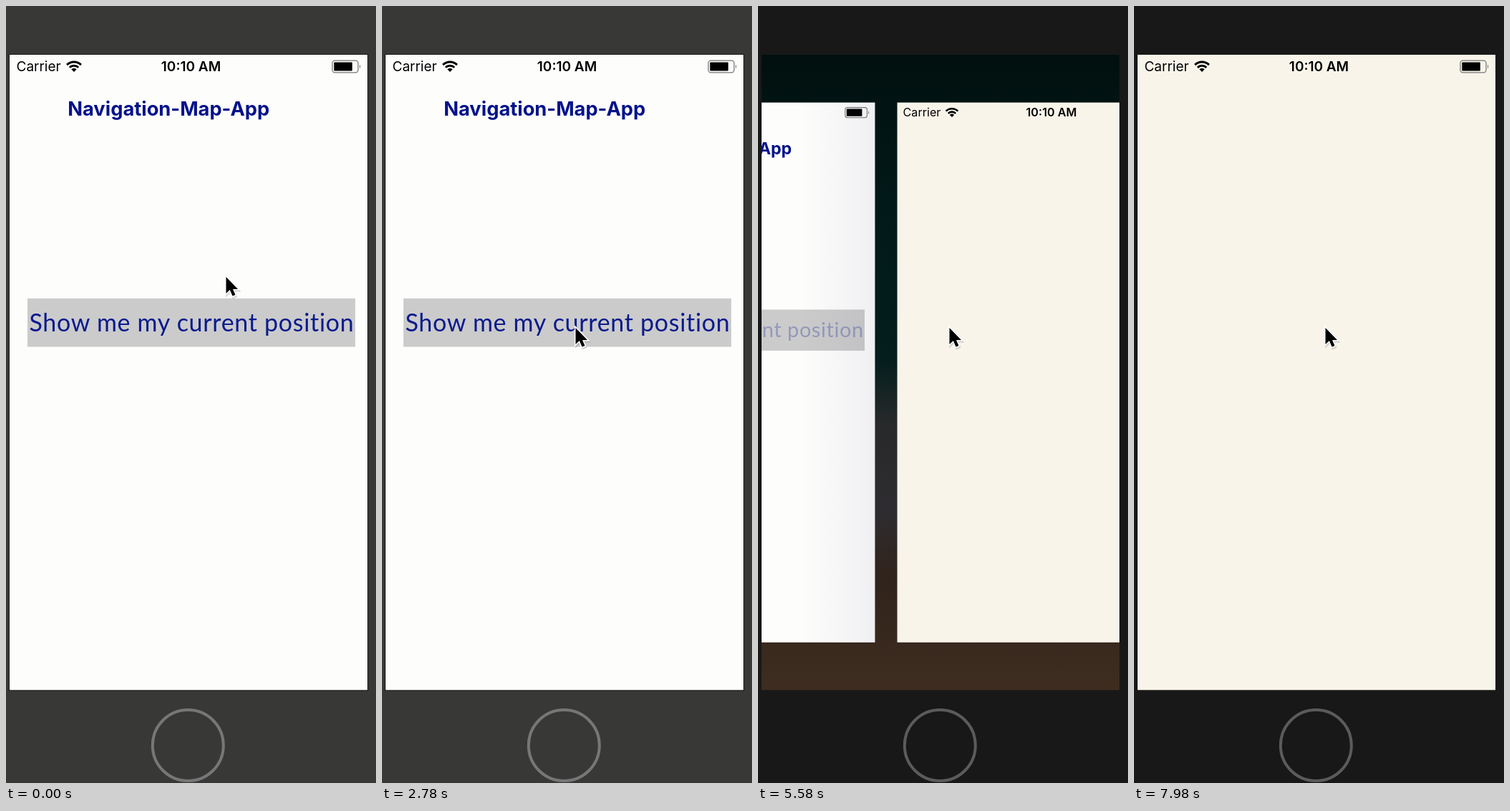
Animation of 517x1084 px, one loop 8000 ms. Source, as an HTML page:

```html
<!DOCTYPE html>
<html lang="en">
<head>
<meta charset="utf-8">
<title>Navigation-Map-App</title>
<style>
html, body { margin: 0; width: 100%; height: 100%; overflow: hidden; }
svg { display: block; width: 517px; height: 1084px; }
text { font: 19px Inter, sans-serif; }
.time { font-weight: 600; text-anchor: middle; }
.title { font: 700 27.3px Inter, sans-serif; fill: #03128a; }
.label {
  font: 34px Lato, sans-serif; fill: #0a1a8c; text-anchor: middle;
  letter-spacing: .7px; font-variant-ligatures: none;
}
</style>
</head>
<body>
<svg viewBox="0 0 517 1084">
  <defs>
    <clipPath id="screen"><rect x="5" y="68" width="500" height="886.5"/></clipPath>
    <linearGradient id="wallpaper" x2="0" y2="1">
      <stop stop-color="#01100f"/>
      <stop offset=".25" stop-color="#011a19"/>
      <stop offset=".48" stop-color="#031e1d"/>
      <stop offset=".58" stop-color="#28292a"/>
      <stop offset=".72" stop-color="#2e2c30"/>
      <stop offset=".82" stop-color="#30231b"/>
      <stop offset="1" stop-color="#3e2d20"/>
    </linearGradient>
    <linearGradient id="shade">
      <stop offset=".75" stop-color="#447" stop-opacity="0"/>
      <stop offset="1" stop-color="#447" stop-opacity=".07"/>
    </linearGradient>
    <g id="status">
      <text x="9.5" y="23">Carrier</text>
      <g transform="translate(90 24)">
        <path d="M-9.9-9.9A14 14 0 0 1 9.9-9.9M-6.2-6.2A8.8 8.8 0 0 1 6.2-6.2" fill="none" stroke="#000" stroke-width="3"/>
        <path d="M0 0L-3.7-3.7A5.2 5.2 0 0 1 3.7-3.7Z"/>
      </g>
      <text class="time" x="253.5" y="23">10:10 AM</text>
      <rect x="451" y="8.2" width="36" height="16.6" rx="3.5" fill="none" stroke="#777" stroke-width="1.3"/>
      <rect x="453.3" y="10.5" width="25.5" height="12" rx="1"/>
      <path d="M489 13.5q2.4 3 0 6z" fill="#777"/>
    </g>
  </defs>
  <rect id="frame" width="517" height="1084"/>
  <rect x="4.5" y="67.5" width="501" height="887.5" fill="none" stroke="#1a1a1a"/>
  <circle id="home" cx="254.3" cy="1031.5" r="49.5" fill="none" stroke-width="4"/>
  <g clip-path="url(#screen)">
    <rect x="5" y="68" width="500" height="886.5" fill="url(#wallpaper)"/>
    <g id="menu">
      <rect width="500" height="886.5" fill="#fdfdfc"/>
      <use href="#status"/>
      <text class="title" x="81.2" y="85">Navigation-Map-App</text>
      <rect x="25" y="340" width="458" height="67.5" fill="#cbcbcb"/>
      <text class="label" id="label" x="254.5" y="385.5">Show me my current position</text>
      <rect id="edge" width="500" height="886.5" fill="url(#shade)"/>
    </g>
    <g id="map">
      <rect width="500" height="886.5" fill="#f8f4e9"/>
      <use href="#status"/>
    </g>
  </g>
  <g id="cursor">
    <path d="M0 0V23L5.3 18 9 26.5 13 25 9.5 17H16.5Z" fill="#778" opacity=".3" stroke="#778" stroke-width="3" transform="translate(1 2)"/>
    <path d="M0 0V23L5.3 18 9 26.5 13 25 9.5 17H16.5Z" stroke="#fff" stroke-width="3" paint-order="stroke"/>
  </g>
</svg>
<script>
const LOOP = 8000, PRESS = 4040, GAP = 36.6, SMALL = 0.848;
const $ = id => document.getElementById(id);
const clamp = v => Math.min(1, Math.max(0, v));
const ease = v => v * v * (3 - 2 * v);

// Critically damped spring: 0 before start, settling at 1.
const spring = (t, start, rate) => {
  const v = Math.max(0, t - start) / 1000 * rate;
  return 1 - (1 + v) * Math.exp(-v);
};

// Pointer stops: time, x, y
const stops = [
  [0, 307.5, 378], [900, 97, 488], [1100, 97, 488], [1620, 300, 611],
  [2400, 264, 453], [2780, 270.5, 449], [3920, 270.5, 449], [4200, 267.5, 449], [LOOP, 267.5, 449]
];

function pointer(t) {
  const i = stops.findIndex(s => s[0] > t);
  const a = stops[i - 1], b = stops[i];
  const k = ease((t - a[0]) / (b[0] - a[0]));
  return [a[1] + (b[1] - a[1]) * k, a[2] + (b[2] - a[2]) * k];
}

function place(id, x, scale) {
  $(id).setAttribute("transform", `translate(${x} 511.25) scale(${scale}) translate(-250 -443.25)`);
}

function draw(t) {
  const dark = t >= PRESS;
  $("frame").setAttribute("fill", dark ? "#181818" : "#383837");
  $("home").setAttribute("stroke", dark ? "#5b5b5b" : "#777778");
  $("label").setAttribute("opacity", 1 - 0.72 * clamp((t - PRESS) / 150));

  // Cards shrink, slide one step left, then grow back.
  const scale = 1 - (1 - SMALL) * (spring(t, 4760, 8) - spring(t, 5694, 4.77));
  const slide = spring(t, 5101, 4.77);
  const pitch = (500 + GAP) * scale;
  place("menu", 255 - slide * pitch, scale);
  place("map", 255 + (1 - slide) * pitch, scale);
  $("edge").setAttribute("opacity", clamp(slide * 2));

  $("cursor").setAttribute("transform", `translate(${pointer(t)})`);
}

const begin = performance.now();
function tick() {
  draw((performance.now() - begin) % LOOP);
  requestAnimationFrame(tick);
}
draw(0);
requestAnimationFrame(tick);
</script>
</body>
</html>
```
